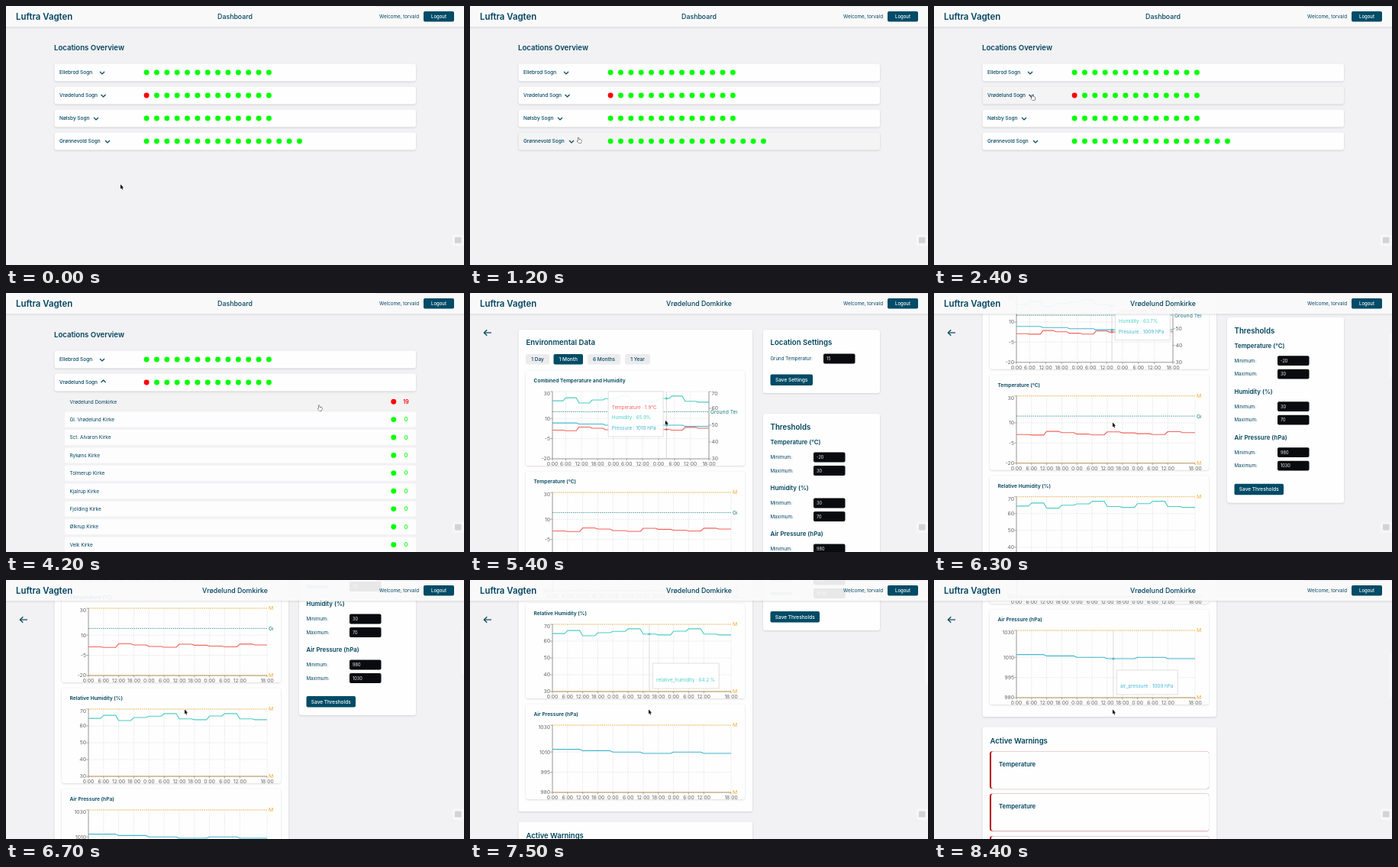
An HTML page with a canvas that plays this animation: 600x339 px, repeating every 8.5 s.

```html
<!DOCTYPE html>
<html lang="en">
<head>
<meta charset="utf-8">
<title>Dashboard</title>
<style>
html, body { margin: 0; width: 100%; height: 100%; overflow: hidden; background: #f2f1f3; }
canvas { display: block; width: 600px; height: 339px; }
</style>
</head>
<body>
<canvas id="stage"></canvas>
<script>
const W = 600, H = 339, LOOP = 8500, STEP = 100;
const INK = '#00445e', GREEN = '#00ff00', RED = '#ff0000', ORANGE = '#f5a623';
const OPEN_AT = 2700, DETAIL_AT = 4500;

const canvas = document.getElementById('stage');
const ctx = canvas.getContext('2d');
const dpr = window.devicePixelRatio || 1;
canvas.width = W * dpr;
canvas.height = H * dpr;

const parishes = [
  { name: 'Ellebrod Sogn', chevron: 126, dots: 13 },
  { name: 'Vrødelund Sogn', chevron: 127.5, dots: 13, alarm: true },
  { name: 'Nølsby Sogn', chevron: 118, dots: 13 },
  { name: 'Grønnevold Sogn', chevron: 133, dots: 16 }
];
const churches = ['Vrødelund Domkirke', 'Gl. Vrødelund Kirke', 'Sct. Alvaron Kirke', 'Rykøns Kirke',
  'Tolmerup Kirke', 'Kjalrup Kirke', 'Fjolding Kirke', 'Ølkrup Kirke', 'Velk Kirke'];

// One reading per six hours, five samples each
const temp = { data: [1.3, 0.9, 3.6, 2.7, 1.6, 1, 3.3, 2.5, 1.9, 1.3, 3.4, 2.7], lo: -20, hi: 30, color: '#f4635e' };
const humid = { data: [64.5, 66.3, 63.2, 65, 65.8, 67.3, 64.2, 63.7, 65.9, 67.3, 64.2, 63.7], lo: 30, hi: 70, color: '#4ecdc4' };
const press = { data: [1012, 1012, 1011, 1011, 1010, 1010, 1009, 1009, 1010, 1010, 1009, 1009], lo: 980, hi: 1030, color: '#45b7d1' };
const SAMPLES = 60, PLOT_X = 108, PLOT_H = 88;

// Keys: [time, value...]
const pointerKeys = [[600, 150, 233.5], [1400, 138, 152], [1900, 127.5, 116.5], [3200, 127.5, 116.5],
  [4100, 409, 147], [4700, 409, 147], [5500, 234, 169.5]];
const scrollKeys = [[5800, 0], [6000, 53], [6700, 224], [6900, 267], [7100, 267],
  [7500, 335], [7900, 400], [8200, 400], [8400, 459]];

function track(keys, t) {
  if (t <= keys[0][0]) return keys[0].slice(1);
  for (let i = 1; i < keys.length; i++) {
    const a = keys[i - 1], b = keys[i];
    if (t <= b[0]) {
      const u = (t - a[0]) / (b[0] - a[0]);
      return a.slice(1).map((v, k) => v + (b[k + 1] - v) * u);
    }
  }
  return keys[keys.length - 1].slice(1);
}

function text(s, x, y, size, weight = 400, color = INK, align = 'left') {
  ctx.font = `${weight} ${size}px Inter, "Open Sans", sans-serif`;
  ctx.textAlign = align;
  ctx.fillStyle = color;
  ctx.fillText(s, x, y + size * 0.36);
}

function box(x, y, w, h, r, fill) {
  ctx.beginPath();
  ctx.roundRect(x, y, w, h, r);
  ctx.fillStyle = fill;
  ctx.fill();
}

function card(x, y, w, h, fill = '#fefefe', r = 3) {
  ctx.save();
  ctx.shadowColor = 'rgba(0,0,0,0.16)';
  ctx.shadowBlur = 2.5 * dpr;
  ctx.shadowOffsetY = 0.8 * dpr;
  box(x, y, w, h, r, fill);
  ctx.restore();
}

function dot(x, y, r, color) {
  ctx.beginPath();
  ctx.arc(x, y, r, 0, Math.PI * 2);
  ctx.fillStyle = color;
  ctx.fill();
}

function line(points, color, width = 1, dash = []) {
  ctx.beginPath();
  points.forEach(([x, y]) => ctx.lineTo(x, y));
  ctx.setLineDash(dash);
  ctx.strokeStyle = color;
  ctx.lineWidth = width;
  ctx.stroke();
  ctx.setLineDash([]);
}

function button(label, x, y, w, h, size = 6.5, fill = '#004b66', color = '#fff') {
  box(x, y, w, h, 2, fill);
  text(label, x + w / 2, y + h / 2, size, 500, color, 'center');
}

function header(title) {
  ctx.save();
  ctx.shadowColor = 'rgba(0,0,0,0.18)';
  ctx.shadowBlur = 2.5 * dpr;
  ctx.shadowOffsetY = 0.6 * dpr;
  ctx.fillStyle = 'rgba(254,254,255,0.91)';
  ctx.fillRect(-5, -5, W + 10, 32.3);
  ctx.restore();
  ctx.fillStyle = '#e6e6e9';
  ctx.fillRect(485, 0, 115, 0.8);
  text('Luftra Vagten', 13, 14, 11.4, 600);
  text(title, 300, 14, 8.8, 500, INK, 'center');
  text('Welcome, torvald', 541, 14, 6.3, 400, INK, 'right');
  button('Logout', 547, 7, 40, 13.5, 6);
}

function overview(t, px, py) {
  const open = t >= OPEN_AT;
  const over = (x, y, w, h) => px >= x && px <= x + w && py >= y && py <= y + h;
  let hot = false;
  text('Locations Overview', 63, 55, 9.6, 600);

  parishes.slice(0, open ? 2 : 4).forEach((p, i) => {
    const y = 75.5 + i * 30, mid = y + 11.5;
    const hover = over(63, y, 474, 23);
    hot = hot || hover;
    card(63.5, y, 473.5, 23, hover ? '#f4f4f5' : '#fefefe');
    text(p.name, 70, mid, 6.5, 500);
    const up = open && i === 1, d = up ? -1.5 : 1.5, cy = up ? mid - 1.5 : mid + 0.5;
    line([[p.chevron - 3, cy - d], [p.chevron, cy + d], [p.chevron + 3, cy - d]], INK, 1.1);
    for (let k = 0; k < p.dots; k++)
      dot(184.1 + k * 13.36, mid, 3.45, p.alarm && k === 0 ? RED : GREEN);
  });

  if (open) churches.forEach((name, i) => {
    const mid = 142.2 + i * 23.4, hover = over(77, mid - 10, 460, 20);
    hot = hot || hover;
    box(77, mid - 10, 460, 20, 2, hover ? '#f3f3f4' : '#fdfdfe');
    text(name, 83.5, mid, 6.4, 400);
    const color = i ? GREEN : RED;
    dot(507.8, mid, 3.45, color);
    text(i ? '0' : '19', 524, mid, 7, 600, color, 'center');
  });
  return hot;
}

const sampleX = (i, w) => PLOT_X + i * w / (SAMPLES - 1);
const valueY = (v, lo, hi, top) => top + (hi - v) / (hi - lo) * PLOT_H;
const hourLabel = i => Math.floor(i / 5) % 4 * 6 + ':00';

// y is the middle of the chart title; series may override their range
function chart(c, y, px) {
  if (y < -115 || y > H + 15) return;
  card(73, y - 13.5, 287, 124.5);
  text(c.title, 83.5, y, 6.65, 600);
  const top = y + 14, bottom = top + PLOT_H, w = c.width, right = PLOT_X + w;
  const main = c.series[0];
  const yOf = v => valueY(v, main.lo, main.hi, top);

  ctx.save();
  ctx.beginPath();
  ctx.rect(83, top - 6, 267, 110);
  ctx.clip();
  c.xTicks.forEach(i => line([[sampleX(i, w), top], [sampleX(i, w), bottom]], '#d4d4d4', 0.6, [1.4, 1.4]));
  c.yTicks.forEach(v => line([[PLOT_X, yOf(v)], [right, yOf(v)]], '#d4d4d4', 0.6, [1.4, 1.4]));
  line([[PLOT_X, top], [PLOT_X, bottom], [right, bottom]], '#777', 0.7);
  c.yTicks.forEach(v => {
    line([[PLOT_X - 2.8, yOf(v)], [PLOT_X, yOf(v)]], '#777', 0.6);
    text(String(v), 105, Math.max(yOf(v), top + 3), 6.8, 400, '#666', 'right');
  });
  c.xTicks.forEach(i => {
    line([[sampleX(i, w), bottom], [sampleX(i, w), bottom + 2.5]], '#777', 0.6);
  });
  if (c.rightAxis) {
    line([[right, top], [right, bottom]], '#777', 0.7);
    [70, 60, 50, 40, 30].forEach(v => {
      const ty = valueY(v, 30, 70, top);
      line([[right, ty], [right + 2.8, ty]], '#777', 0.6);
      text(String(v), right + 3.5, Math.max(ty, top + 3), 6.8, 400, '#666');
    });
  }
  c.refs.forEach(([v, label, color]) => {
    line([[PLOT_X, yOf(v)], [right, yOf(v)]], color, 0.8, [1.5, 1.2]);
    text(label, right + 2, yOf(v), 6.8, 400, color);
  });
  c.series.forEach(s => {
    const pts = [];
    for (let i = 0; i < SAMPLES; i++)
      pts.push([sampleX(i, w), valueY(s.data[Math.floor(i / 5)], s.lo, s.hi, top)]);
    line(pts, s.color, 1.15);
  });
  ctx.restore();
  [...c.xTicks].forEach(i => text(hourLabel(i), sampleX(i, w), bottom + 6.4, 6.7, 400, '#666', 'center'));
  if (px !== null) tooltip(c, top, px);
}

function tooltip(c, top, px) {
  const i = Math.round((px - PLOT_X) / c.width * (SAMPLES - 1));
  const x = sampleX(i, c.width), seg = Math.floor(i / 5);
  line([[x, top], [x, top + PLOT_H]], '#ccc', 0.7);
  c.series.forEach(s => dot(x, valueY(s.data[seg], s.lo, s.hi, top), 1.5, s.color));
  const [w, h, dy] = c.tip;
  let left = x + 4.3;
  if (left + w > PLOT_X + c.width) left = x - 4.3 - w;
  ctx.fillStyle = 'rgba(255,255,255,0.92)';
  ctx.fillRect(left, top + dy, w, h);
  ctx.strokeStyle = '#ccc';
  ctx.lineWidth = 0.6;
  ctx.strokeRect(left, top + dy, w, h);
  const n = c.series.length;
  c.series.forEach((s, k) => {
    const value = s.data[seg];
    text(c.format[k](value), left + 4.7, top + dy + h - 11.2 - (n - 1 - k) * 13.6, 6.3, 400, s.color);
  });
}

const every5 = [0, 5, 10, 15, 20, 25, 30, 35, 40, 45, 50, 59];
const charts = [
  { title: 'Combined Temperature and Humidity', width: 205, rightAxis: true, yTicks: [30, 10, -5, -20],
    xTicks: [0, 5, 11, 17, 23, 28, 34, 40, 46, 52, 59],
    series: [temp, humid, { ...press, hi: 1040 }], refs: [[15, 'Ground Temperature', '#1f7f82']],
    tip: [72, 59, 0],
    format: [v => `Temperature : ${v}°C`, v => `Humidity : ${v}%`, v => `Pressure : ${v} hPa`] },
  { title: 'Temperature (°C)', width: 234, yTicks: [30, 10, -5, -20], xTicks: every5, series: [temp],
    refs: [[30, 'Max', ORANGE], [15, 'Ground Temperature', '#1f7f82'], [-20, 'Min', ORANGE]],
    tip: [80, 33, 51], format: [v => `temperature : ${v} °C`] },
  { title: 'Relative Humidity (%)', width: 234, yTicks: [70, 60, 50, 40, 30], xTicks: every5, series: [humid],
    refs: [[70, 'Max', ORANGE], [30, 'Min', ORANGE]],
    tip: [87, 33, 51], format: [v => `relative_humidity : ${v} %`] },
  { title: 'Air Pressure (hPa)', width: 234, yTicks: [1030, 1010, 995, 980], xTicks: every5, series: [press],
    refs: [[1030, 'Max', ORANGE], [980, 'Min', ORANGE]],
    tip: [80, 32, 52], format: [v => `air_pressure : ${v} hPa`] }
];

function field(label, value, x, y) {
  text(label, 393.5, y, 6.2);
  box(x, y - 6.4, 41.5, 12.8, 2, '#0a0b0e');
  text(value, x + 4, y, 5.6, 400, '#f2f2f2');
}

function sidebar() {
  card(384, 48, 153, 83);
  text('Location Settings', 393.5, 65, 9.6, 600);
  field('Grund Temperatur:', '15', 463, 86);
  button('Save Settings', 393.5, 106.5, 55.5, 14.5);

  card(384, 158, 153, 243);
  text('Thresholds', 393.5, 175.5, 9.7, 600);
  [['Temperature (°C)', '-20', '30'], ['Humidity (%)', '30', '70'], ['Air Pressure (hPa)', '980', '1030']]
    .forEach(([name, min, max], i) => {
      const y = 195.5 + i * 60;
      text(name, 393.5, y, 7.9, 600);
      field('Minimum:', min, 450, y + 19.5);
      field('Maximum:', max, 450, y + 37);
    });
  button('Save Thresholds', 393.5, 376, 64.5, 14.5);
}

function detail(t, px, py) {
  const [scroll] = track(scrollKeys, t);
  ctx.save();
  ctx.translate(0, -scroll);
  card(63.5, 48, 306.5, 590);
  text('Environmental Data', 73.5, 65, 9.6, 600);
  [['1 Day', 73, 31], ['1 Month', 109.5, 38.5], ['6 Months', 154, 43], ['1 Year', 203, 33]]
    .forEach(([label, x, w], i) => i === 1
      ? button(label, x, 80, w, 13.5)
      : button(label, x, 80, w, 13.5, 6.5, '#ececee', INK));
  sidebar();

  card(63.5, 651.5, 306.5, 230);
  text('Active Warnings', 73.5, 669.5, 9.5, 600);
  for (let i = 0; i < 3; i++) {
    const y = 683.3 + i * 55.5;
    card(73, y, 287, 48.7, '#b8141c');
    box(75, y, 285, 48.7, 3, '#fefefe');
    text('Temperature', 85, y + 16.5, 7.8, 600);
  }
  ctx.restore();

  const inPlot = px < PLOT_X + 205;
  const active = t >= 8000 ? 3 : t >= 6950 ? 2 : inPlot ? 0 : -1;
  charts.forEach((c, i) => chart(c, 115 + i * 132 - scroll, i === active ? px : null));

  line([[28, 52], [18.5, 52]], INK, 1.2);
  line([[22.3, 48.2], [18.3, 52], [22.3, 55.8]], INK, 1.2);
  if (t >= 5800) box(597.3, 36 + scroll * 0.13, 2.2, 58, 1, 'rgba(255,255,255,0.65)');
}

function shape(x, y, pts, fill, stroke) {
  ctx.beginPath();
  pts.forEach(([dx, dy]) => ctx.lineTo(x + dx, y + dy));
  ctx.closePath();
  ctx.lineJoin = 'round';
  ctx.lineWidth = 1;
  ctx.strokeStyle = stroke;
  ctx.stroke();
  ctx.fillStyle = fill;
  ctx.fill();
}

function pointer(x, y, hand) {
  if (hand) {
    shape(x, y, [[0.4, 0.2], [1.4, 0], [2, 2.4], [4.6, 2.8], [5, 4.6], [4.3, 7], [1.6, 7], [-0.6, 4.4], [0.8, 4]],
      '#fff', '#222');
  } else {
    shape(x, y, [[0, 0], [0, 5.8], [1.3, 4.7], [2.2, 6.8], [3.2, 6.4], [2.3, 4.3], [4, 4.2]], '#000', '#fff');
  }
}

function draw(t) {
  ctx.setTransform(dpr, 0, 0, dpr, 0, 0);
  ctx.fillStyle = '#f2f1f3';
  ctx.fillRect(0, 0, W, H);
  const [px, py] = track(pointerKeys, t);
  const onDetail = t >= DETAIL_AT;
  let hand = false;
  if (onDetail) detail(t, px, py);
  else hand = overview(t, px, py);
  header(onDetail ? 'Vrødelund Domkirke' : 'Dashboard');
  box(584.5, 299.5, 18, 14.5, 3, '#f7f6f8');
  box(588, 302.5, 8.5, 8, 1, '#d3d3d5');
  pointer(px, py, hand);
}

const start = performance.now();
function tick(now) {
  const t = Math.max(0, now - start) % LOOP;
  draw(Math.floor(t / STEP) * STEP);
  requestAnimationFrame(tick);
}
draw(0);
requestAnimationFrame(tick);
</script>
</body>
</html>
```
